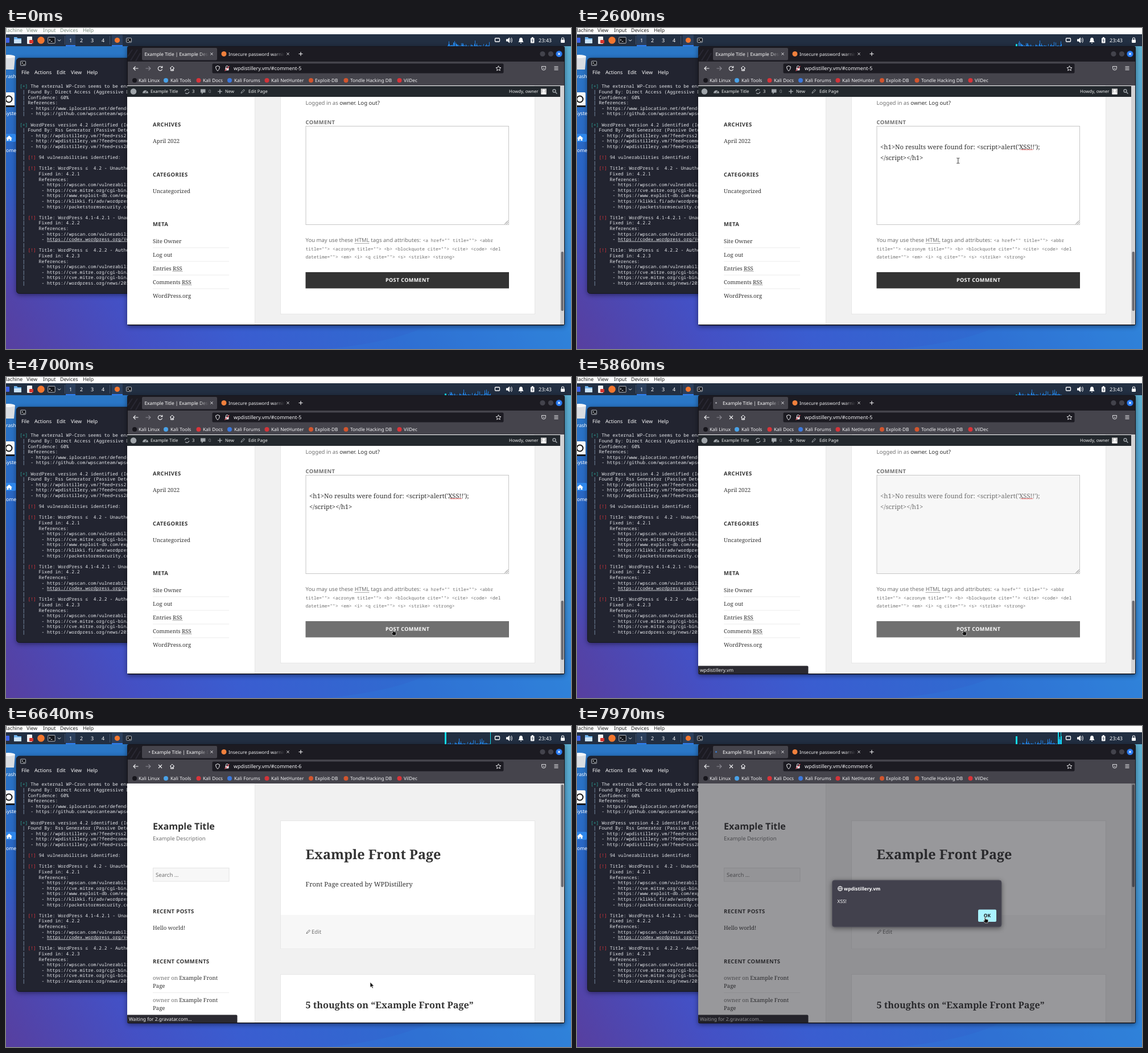
An HTML page that plays this animation: 993 by 564 pixels, repeating every 8 s.

```html
<!DOCTYPE html>
<html lang="en">
<head>
<meta charset="utf-8">
<title>Comment form demo</title>
<style>
html, body { margin: 0; width: 100%; height: 100%; overflow: hidden; background: #3465cf; }
svg { display: block; width: 993px; height: 564px; }
text { font-family: "Noto Sans", sans-serif; white-space: pre; text-rendering: geometricPrecision; }
.s { font-family: "Noto Serif", serif; }
.m { font-family: "Noto Sans Mono", monospace; }
.b { font-weight: 700; }
.h { font-weight: 700; letter-spacing: .04em; }
</style>
</head>
<body>
<svg viewBox="0 0 993 564">
  <defs>
    <linearGradient id="sky" gradientUnits="userSpaceOnUse" x1="0" y1="564" x2="993" y2="0">
      <stop offset="0" stop-color="#573f9f"/><stop offset=".18" stop-color="#4450c4"/>
      <stop offset=".32" stop-color="#3a5dd0"/><stop offset=".54" stop-color="#306ad0"/>
      <stop offset=".76" stop-color="#2f80d8"/><stop offset="1" stop-color="#62b4d0"/>
    </linearGradient>
    <linearGradient id="left" x2="0" y2="1">
      <stop offset="0" stop-color="#2a78c6"/><stop offset=".5" stop-color="#2963c4"/>
      <stop offset="1" stop-color="#3f52c4" stop-opacity="0"/>
    </linearGradient>
    <linearGradient id="fade">
      <stop offset="0" stop-color="#45444c" stop-opacity="0"/><stop offset="1" stop-color="#45444c"/>
    </linearGradient>
    <linearGradient id="fade2">
      <stop offset="0" stop-color="#1c1b22" stop-opacity="0"/><stop offset="1" stop-color="#1c1b22"/>
    </linearGradient>
    <filter id="shadow" x="-10%" y="-20%" width="120%" height="150%" color-interpolation-filters="sRGB">
      <feDropShadow dx="0" dy="2" stdDeviation="4" flood-opacity=".45"/>
    </filter>
    <clipPath id="view"><rect x="213" y="101" width="768" height="420"/></clipPath>
  </defs>
  <g id="still"></g>
  <g id="live"></g>
</svg>
<script>
const LOOP = 8000, PASTE = 2130, SUBMIT = 4850, LOADED = 6250, ALERT = 6690;
const esc = s => s.replace(/&/g, '&amp;').replace(/</g, '&lt;');
const rect = (x, y, w, h, fill, more = '') =>
  `<rect x="${x}" y="${y}" width="${w}" height="${h}" fill="${fill}" ${more}/>`;
const dot = (x, y, r, fill, more = '') => `<circle cx="${x}" cy="${y}" r="${r}" fill="${fill}" ${more}/>`;
const line = (d, color, width = 1, fill = 'none') =>
  `<path d="${d}" stroke="${color}" stroke-width="${width}" fill="${fill}"/>`;
const raw = (x, y, s, size, fill, cls = '') =>
  `<text x="${x}" y="${y}" font-size="${size}" fill="${fill}" class="${cls}">${s}</text>`;
const text = (x, y, s, ...rest) => raw(x, y, esc(s), ...rest);
const cross = (x, y, r, color, w = 1) =>
  line(`M${x - r} ${y - r}l${2 * r} ${2 * r}m0 ${-2 * r}l${-2 * r} ${2 * r}`, color, w);
const plus = (x, y, r, color, w) => line(`M${x - r} ${y}h${2 * r}M${x} ${y - r}v${2 * r}`, color, w);
const shell = (x, y, r) =>
  rect(x - r, y - r * .85, 2 * r, r * 1.7, '#15171d', 'rx="1" stroke="#c8ccd4" stroke-width=".9"') +
  line(`M${x - r + 2} ${y - 2}l2 1.5l-2 1.5m3 1h2.5`, '#fff', .9);
const pencil = (x, y, color) => line(`M${x - 3} ${y + 3}l1-2.5l4-4l1.5 1.5l-4 4z`, color, 1);

function terminal() {
  const url = s => ' |      - https://' + s;
  const scan = url('wpscan.com/vulnerability'), cve = url('cve.mitre.org/cgi-bin/cve');
  const issue = (title, fixed, ...refs) =>
    [' |', ' | [!] Title: WordPress ' + title, ' |     Fixed in: ' + fixed, ' |     References:', scan, ...refs];
  const feed = ' |  - http://wpdistillery.vm/?feed=';
  const rows = [
    '[+] The external WP-Cron seems to be enabled',
    ' | Found By: Direct Access (Aggressive Detection)', ' | Confidence: 60%', ' | References:',
    ' |  - https://www.iplocation.net/defend-wordpress', ' |  - https://github.com/wpscanteam/wpscan', '',
    '[+] WordPress version 4.2 identified (Insecure)',
    ' | Found By: Rss Generator (Passive Detection)',
    feed + 'rss2,', feed + 'comments', feed + 'rss2&', ' |', ' | [!] 94 vulnerabilities identified:',
    ...issue('≤  4.2 - Unauthenticated', '4.2.1', cve, url('www.exploit-db.com/exploits'),
      url('klikki.fi/adv/wordpress'), url('packetstormsecurity.com')),
    ...issue('4.1-4.2.1 - Unauthenticated', '4.2.2', url('codex.wordpress.org/Version')),
    ...issue('≤  4.2.2 - Authenticated', '4.2.3', cve, cve, url('wordpress.org/news/2015'))
  ].map(row => row.replace('≤  ', '≤  '.slice(0, 3)));
  let out = rect(18.5, 53, 220, 413.5, '#222430', 'rx="5" stroke="#15171f" filter="url(#shadow)"') + shell(30, 62, 4.5);
  [['File', 27], ['Actions', 50], ['Edit', 89], ['View', 114], ['Help', 142]]
    .forEach(([s, x]) => out += text(x, 81, s, 8.8, '#fff'));
  rows.forEach((row, i) => {
    const y = 105.4 + i * 9.6;
    const s = esc(row.slice(0, 44))
      .replace('[+]', '<tspan fill="#2fa79b">[+]</tspan>')
      .replace('[!]', '<tspan fill="#d8343a">[!]</tspan>')
      .replace('|', '<tspan fill="#a9cbe6">|</tspan>');
    out += raw(24, y, s, 8, '#e6e8ec', 'm');
    if (row.includes('codex')) out += rect(72, y + .6, 145, .8, '#e6e8ec');
  });
  return out;
}

function desktop() {
  let out = rect(0, 0, 993, 564, 'url(#sky)') + rect(0, 30, 240, 440, 'url(#left)') +
    '<path d="M560 564Q690 552 750 518H993V564Z" fill="#2c86dc" opacity=".18"/>' + terminal() +
    rect(0, 0, 993, 11, '#fdfdfd') + rect(0, 11, 993, 21, '#222f42');
  // panel launchers
  out += rect(-3, 17, 9, 9, '#3d63e8', 'rx="1"') +
    '<path d="M14 16h5l1.5 2H27v9H14z" fill="#6fb4ee"/>' + rect(14, 20, 13, 7, '#c9e2f8', 'rx="1"') +
    rect(37, 15, 9, 13, '#f2f2f2', 'rx="1"') + rect(41, 21, 7, 6, '#d8362e', 'rx="1"') +
    dot(61.5, 21.5, 6.3, '#f2762e') + shell(80, 21.5, 6.2) + line('M91 20.5l2.5 2.5l2.5-2.5', '#fff') +
    rect(103, 14, 1, 15, '#45536a') + rect(105, 12, 17, 20, '#2b3f5c') + rect(105, 30, 17, 2, '#2f7df0') +
    rect(182, 14, 1, 15, '#45536a') + rect(186, 12, 19, 20, '#2b3f5c') + rect(186, 30, 19, 2, '#2f7df0') +
    dot(195.5, 21.5, 4.6, '#f2762e') + shell(216, 21.5, 4.5);
  [111, 130, 149, 168].forEach((x, i) => out += text(x, 24.8, '' + (i + 1), 9, '#fff'));
  // tray
  out += rect(859.5, 18, 8, 6, 'none', 'rx="1" stroke="#fff" stroke-width="1.3"') +
    '<path d="M879 19.5h2.5l3.5-3v10l-3.5-3H879z" fill="#fff"/>' +
    line('M886.5 18.5q2 3 0 6M888 17q3.2 4.5 0 9', '#fff', .9) +
    '<path d="M900.5 25q1.5-1.5 1.5-4q0-4 3-4t3 4q0 2.5 1.5 4zM904 26h2v1h-2z" fill="#fff"/>' +
    rect(922, 17.5, 6.5, 9, '#fff', 'rx="1"') + rect(924, 16, 2.5, 2, '#fff') +
    line('M926 19l-2 3h2.5l-2 3', '#222f42', .8) + text(936, 24.8, '23:43', 9, '#fff') +
    rect(975, 20.5, 7, 5.5, '#fff', 'rx="1"') + line('M976.5 21v-2a2 2 0 0 1 4 0v2', '#fff', 1.1);
  // desktop icons
  return out + '<path d="M-6 50H16L14 73H-6z" fill="#d9dde2"/><ellipse cx="4" cy="50" rx="12" ry="3" fill="#f5f6f8"/>' +
    text(0, 88, 'rash', 8.6, '#fff') + rect(-8, 113, 23, 25, '#f6f6f6', 'rx="2"') +
    dot(5, 125, 5.5, '#fff', 'stroke="#111" stroke-width="2"') + rect(-8, 136, 23, 3, '#16181d') +
    text(-3, 153, 'Syste', 8.6, '#fff') + rect(-8, 186, 25, 14, '#2f86ea', 'rx="2"') +
    '<path d="M0 194l5.500-5l5.500 5h-1.500v4h-3v-3h-2v3h-3v-4z" fill="#fff"/>' + text(0, 218, 'ome', 8.6, '#fff');
}

function chrome() {
  const ink = '#f4f4f6';
  let out = rect(213, 32, 769, 490.5, '#16151b', 'rx="3" filter="url(#shadow)"') + rect(214, 33, 767, 26, '#1c1b22') +
    line('M214 50l8-12M219 57l12-19M228 58l8-14', '#292833', 2) +
    rect(214, 59, 767, 43, '#45444c') + rect(239, 35, 132, 21.5, '#45444c', 'rx="2"') +
    dot(383, 45.5, 4.5, '#f0803c') + text(391, 48.7, 'Insecure password warning', 8.1, '#f0f0f2') +
    rect(470, 38, 20, 15, 'url(#fade2)') + rect(490, 38, 12, 15, '#1c1b22') + cross(495.5, 45.5, 2, ink) +
    plus(518, 45.5, 3.5, ink, 1.1) + dot(943, 45.5, 4.6, '#43434c') + dot(957.5, 45.5, 4.6, '#43434c') +
    dot(972, 45.5, 5.6, '#2678f0') + cross(972, 45.5, 1.9, '#fff', 1.2);
  out += line('M232.5 71h-8.500m3.500-3.500l-3.500 3.500l3.500 3.500', ink, 1.1) +
    line('M245.5 71h8.500m-3.500-3.500l3.500 3.500l-3.500 3.500', '#8b8a93', 1.1) +
    line('M288 71l4-4l4 4M289.5 70v5h5v-5M291.5 75v-2.5h1.5v2.5', ink) +
    rect(362.5, 62.5, 512, 17, '#1c1b22', 'rx="2"') +
    line('M372 66.5l3.5 1.5q0 5-3.5 7.5q-3.5-2.5-3.5-7.5z', ink) +
    rect(385.5, 70, 6, 4.5, ink, 'rx=".8"') + line('M386.5 70v-1.5a2 2 0 0 1 4 0v1.5', ink) +
    line('M384.5 75.5l8-8.5', '#e04858', 1.1) +
    line('M865.5 66.5l1.3 2.9l3.2.3l-2.4 2.1l.7 3.1l-2.8-1.7l-2.8 1.7l.7-3.1l-2.4-2.1l3.2-.3z', ink, .9) +
    line('M941.5 67.5h7v3a3.5 3.5 0 0 1-7 0zM943.5 70l1.5 1.5l1.5-1.5', ink, .9) +
    line('M963.5 68h7M963.5 70.7h7M963.5 73.4h7', ink);
  [[226, '#17161c', 'Kali Linux', 233], [281, '#4aa3e8', 'Kali Tools', 289], [338.5, '#d8343a', 'Kali Docs', 346],
   [393, '#3c78dc', 'Kali Forums', 401], [458.5, '#d2343a', 'Kali NetHunter', 466], [536, '#d2552e', 'Exploit-DB', 543],
   [597.5, '#d2552e', 'Tondle Hacking DB', 605], [691.5, '#d8343a', 'VilDec', 699]]
    .forEach(([ix, color, s, x]) => out += dot(ix, 92, 4, color) + text(x, 95, s, 8.25, ink));
  return out;
}

const side = rect(213, 101, 761, 420, '#f1f1f1') + rect(213, 101, 224, 420, '#fff') +
  rect(437, 101, 1, 420, '#e6e6e6') + rect(974, 101, 7, 420, '#d2d2d4');
const heading = (y, s) => text(258, y, s, 9.5, '#333', 'h');
const item = (y, s) => text(258, y, s, 9.6, '#333', 's');
const rule = y => rect(258, y, 134, 1, '#ececec');
const card = (y, h) => rect(482.5, y, 447, h, '#fff', 'stroke="#e7e7e7"');

function toolbar() {
  const ink = '#eee', icon = '#a0a5aa', put = (x, s, c = ink) => text(x, 114.3, s, 7.7, c);
  return rect(213, 102, 761, 19, '#23282d') + dot(224, 111.5, 5.3, icon) +
    '<path d="M240 114.5a5 5 0 1 1 10 0z" fill="#a0a5aa"/>' + line('M245 114l2.5-4', '#23282d', 1) + put(254, 'Example Title') +
    line('M314.5 111a3.7 3.7 0 0 1 6.5-2m.8 3a3.7 3.7 0 0 1-6.5 2', icon, 1.4) + put(327, '3') +
    '<path d="M342 107.5h8.5v6h-4l-2.5 3v-3h-2z" fill="#a0a5aa"/>' + put(356, '0', '#888d92') +
    plus(376, 111.5, 3.8, icon, 1.7) + put(385, 'New') + pencil(416, 111.5, icon) + put(426, 'Edit Page') +
    put(884, 'Howdy, owner') + rect(940, 106.5, 10, 10, '#c8c8c8') +
    '<path d="M941 116.5q0-4 4-4t4 4z" fill="#fff"/>' + dot(945, 110, 2.2, '#fff') +
    dot(963.5, 110.5, 2.5, 'none', `stroke="${icon}" stroke-width="1.4"`) + line('M965.5 112.5l3 3', icon, 1.5);
}

function formPage(t, hover) {
  const grey = '#707070', sent = t >= SUBMIT, ink = sent ? grey : '#333';
  const code = (x, y, s) => text(x, y, s, 7.95, grey, 'm');
  const dots = (x, y, w) => `<path d="M${x} ${y}h${w}" stroke="#555" stroke-dasharray="1 1"/>`;
  let out = side + rect(975.5, 393, 4.5, 104, '#6c6c72', 'rx="2"') + card(100, 402.5) + toolbar() +
    heading(172.8, 'ARCHIVES') + item(201.6, 'April 2022') +
    heading(261, 'CATEGORIES') + item(289.6, 'Uncategorized') + heading(348.4, 'META');
  ['Site Owner', 'Log out', 'Entries RSS', 'Comments RSS', 'WordPress.org'].forEach((s, i) => {
    out += item(377.6 + i * 24, s) + (i < 4 ? rule(385.5 + i * 24) : '');
  });
  out += dots(293, 427.5, 17) + dots(309, 451.5, 17) +
    raw(526.5, 135, 'Logged in as <tspan fill="#333">owner. Log out?</tspan>', 9.6, grey) +
    text(526.5, 168.5, 'COMMENT', 9.4, grey, 'h') +
    rect(527, 172.5, 356.5, 173, sent ? '#f7f7f7' : '#fff', 'stroke="#c6c6c6"') +
    line('M876.5 344.5l6-6m-3 6l3-3', '#777') +
    text(526.5, 376.3, 'You may use these HTML tags and attributes: ', 9.55, grey) + dots(613, 378.5, 25) +
    code(732.5, 375.8, '<a href="" title=""> <abbr') +
    code(526.5, 390.6, 'title=""> <acronym title=""> <b> <blockquote cite=""> <cite> <code> <del') +
    code(526.5, 405.2, 'datetime=""> <em> <i> <q cite=""> <s> <strike> <strong>') +
    rect(526.5, 429, 357.5, 28.5, hover ? grey : '#333') + text(667, 446.4, 'POST COMMENT', 9.05, '#fff', 'h');
  if (t >= PASTE) {
    out += text(533, 212.6, "<h1>No results were found for: <script>alert('XSS!!');", 11.24, ink, 's') +
      text(533, 231.6, '<\/script></h1>', 11.24, ink, 's') +
      line('M780 214.5' + 'l1.5-1.5l1.5 1.5'.repeat(7), '#e03030', .9);
    if (!sent && Math.floor(t / 500) % 2 === 0) out += rect(609, 219, 1.2, 16, '#222');
  } else if (t >= 1520) out += rect(533, 181, 1.2, 16, '#222');
  return out;
}

function frontPage() {
  let out = side + rect(975.5, 103, 4.5, 180, '#6c6c72', 'rx="2"') + card(166.5, 224.5) +
    rect(483, 332, 446, 58.5, '#f7f7f7') + card(436.5, 100) +
    text(258, 181.6, 'Example Title', 16.2, '#333', 'b') + text(258, 200.6, 'Example Description', 9.6, '#707070') +
    rect(258.5, 249.5, 133.5, 23.5, '#f7f7f7', 'stroke="#e4e4e4"') + text(263, 264.6, 'Search …', 9.6, '#707070') +
    heading(328.5, 'RECENT POSTS') + item(357.7, 'Hello world!') + heading(416.5, 'RECENT COMMENTS') + rule(468);
  [446, 484.5].forEach(y => out += item(y + 14.4, 'Page') +
    raw(258, y, '<tspan fill="#707070">owner on </tspan>Example Front', 9.6, '#333', 's'));
  return out + text(526.5, 234, 'Example Front Page', 23.4, '#333', 's b') +
    text(526.5, 282, 'Front Page created by WPDistillery', 11.3, '#333', 's') +
    pencil(531, 361.7, '#707070') + text(537, 365.2, 'Edit', 9.6, '#707070') +
    text(526.5, 496.3, '5 thoughts on “Example Front Page”', 16.2, '#333', 's b');
}

const status = s => rect(212, 507.5, 194.5, 16, '#2b2a31', 'rx="2"') + text(216, 518, s, 8.4, '#f0f0f2');

function dialog(fill) {
  return rect(213, 101, 768, 420, '#1c1b22', 'opacity=".45"') +
    rect(448.5, 271, 297.5, 82, '#42414d', 'rx="4" stroke="#55545f" filter="url(#shadow)"') +
    dot(462.5, 285.7, 4, 'none', 'stroke="#fff"') + line('M458.5 285.7h8M462.5 281.7q-3.5 4 0 8q3.5-4 0-8', '#fff', .8) +
    text(469, 288.7, 'wpdistillery.vm', 8.4, '#fff', 'b') + text(457.5, 310.6, 'XSS!', 8.4, '#fff') +
    rect(705, 322.5, 32, 21.5, fill, 'rx="2"') + text(714.8, 336.3, 'OK', 8.4, '#15141a', 'b');
}

// CPU history: one sample every 230 ms, busy once the new page arrives
const busy = [21, 21, 9, 13, 8, 21, 14];
function load(k) {
  if (k >= 28) return busy[k - 28];
  const s = Math.sin(k * 12.9898) * 43758.5453, r = s - Math.floor(s);
  return r < .25 ? 0 : 1 + 9 * r ** 6;
}
function graph(t) {
  const now = Math.floor(t / 230);
  let out = t < 1600 ? '' : rect(771, 32 - load(now), 3, load(now), '#14dcec');
  for (let i = 0; i < 76; i++) {
    const h = load(now - 75 + i);
    if (h) out += rect(776 + i, 32 - h, 1, h, h > 11 ? '#14dcec' : '#2383e4');
  }
  return out;
}

const path = [[150, 944, 560], [740, 669, 227], [2440, 669, 227], [3070, 674, 265], [3380, 674, 265], [3690, 672, 338],
  [3840, 678, 454], [4010, 678, 454], [4470, 680, 444], [5800, 680, 444], [6450, 640, 450], [6800, 640, 450],
  [7430, 708, 357], [7970, 717, 336], [8000, 717, 336]];
function pointer(t) {
  const i = path.findIndex(p => p[0] > t), [t0, x0, y0] = path[i - 1], [t1, x1, y1] = path[i];
  const u = (t - t0) / (t1 - t0), e = u * u * (3 - 2 * u);
  return [x0 + (x1 - x0) * e, y0 + (y1 - y0) * e];
}
const shapes = {
  arrow: '<path d="M0 0v9.5l2.2-2l1.6 3.5l1.6-.8l-1.6-3.3h3z" fill="#111" stroke="#fff" stroke-width=".7"/>',
  beam: line('M-2.5-4.5h2l.5.5l.5-.5h2M-2.5 4.5h2l.5-.5l.5.5h2M0-4v8', '#333', 1),
  hand: '<path d="M-.7 0q1-1 1.7 0v3.2l3.8.8q1 .3 1 1.5l-.8 4.5h-5l-2.8-3.8q.2-1.4 2.1-.2z" fill="#111" stroke="#fff" stroke-width=".6"/>'
};

function scene(t) {
  const loading = t >= SUBMIT, loaded = t >= LOADED, alerting = t >= ALERT;
  const [x, y] = t < 150 ? [-50, -50] : pointer(t);
  const over = (l, top, r, b) => x > l && x < r && y > top && y < b;
  const onButton = !loaded && over(527, 429, 884, 458), onOk = alerting && over(705, 322, 737, 344);
  const kind = onButton || onOk ? 'hand' : !loaded && over(527, 172, 884, 346) ? 'beam' : 'arrow';
  let out = graph(t);
  [['Machine', -6], ['View', 36], ['Input', 65], ['Devices', 95], ['Help', 135]]
    .forEach(([s, mx]) => out += text(mx, 7, s, 8.8, t < 70 ? '#75897b' : '#1a1a1a'));
  // tab and address bar
  out += text(loading ? 256 : 243.5, 48.7, loading ? 'Example Title | Example D' : 'Example Title | Example Desc', 8.3, '#fff') +
    rect(338, 38, 18, 15, 'url(#fade)') + rect(356, 38, 13, 15, '#45444c') + cross(361.5, 45.5, 2, '#f4f4f6');
  if (loading) {
    const swing = 248.3 - 3.8 * Math.cos((t - 5860) / 528 * 2 * Math.PI);
    out += dot(swing.toFixed(2), 45.5, 1.3, alerting ? '#3a8cf0' : '#b4b4bc') + cross(271, 71, 3, '#f4f4f6', 1.1);
  } else out += line('M274.3 69.5a3.7 3.7 0 1 0 .2 2.8M274.8 66.8v3h-3', '#f4f4f6', 1.1);
  out += text(400, 74.2, 'wpdistillery.vm/#comment-' + (loaded ? 6 : 5), 8.9, '#fbfbfe');
  // page
  out += '<g clip-path="url(#view)">' + (loaded ? frontPage() : formPage(t, onButton)) +
    (loading ? status(loaded ? 'Waiting for 2.gravatar.com…' : 'wpdistillery.vm') : '') +
    (alerting ? dialog(onOk ? (t > 7850 ? '#aaf2ff' : '#80ebff') : '#00ddff') : '') + '</g>';
  return out + `<g transform="translate(${x.toFixed(1)} ${y.toFixed(1)})">${shapes[kind]}</g>`;
}

const live = document.getElementById('live');
document.getElementById('still').innerHTML = desktop() + chrome();
let last = '';
function tick() {
  const next = scene(performance.now() % LOOP);
  if (next !== last) live.innerHTML = last = next;
  requestAnimationFrame(tick);
}
tick();
</script>
</body>
</html>
```
